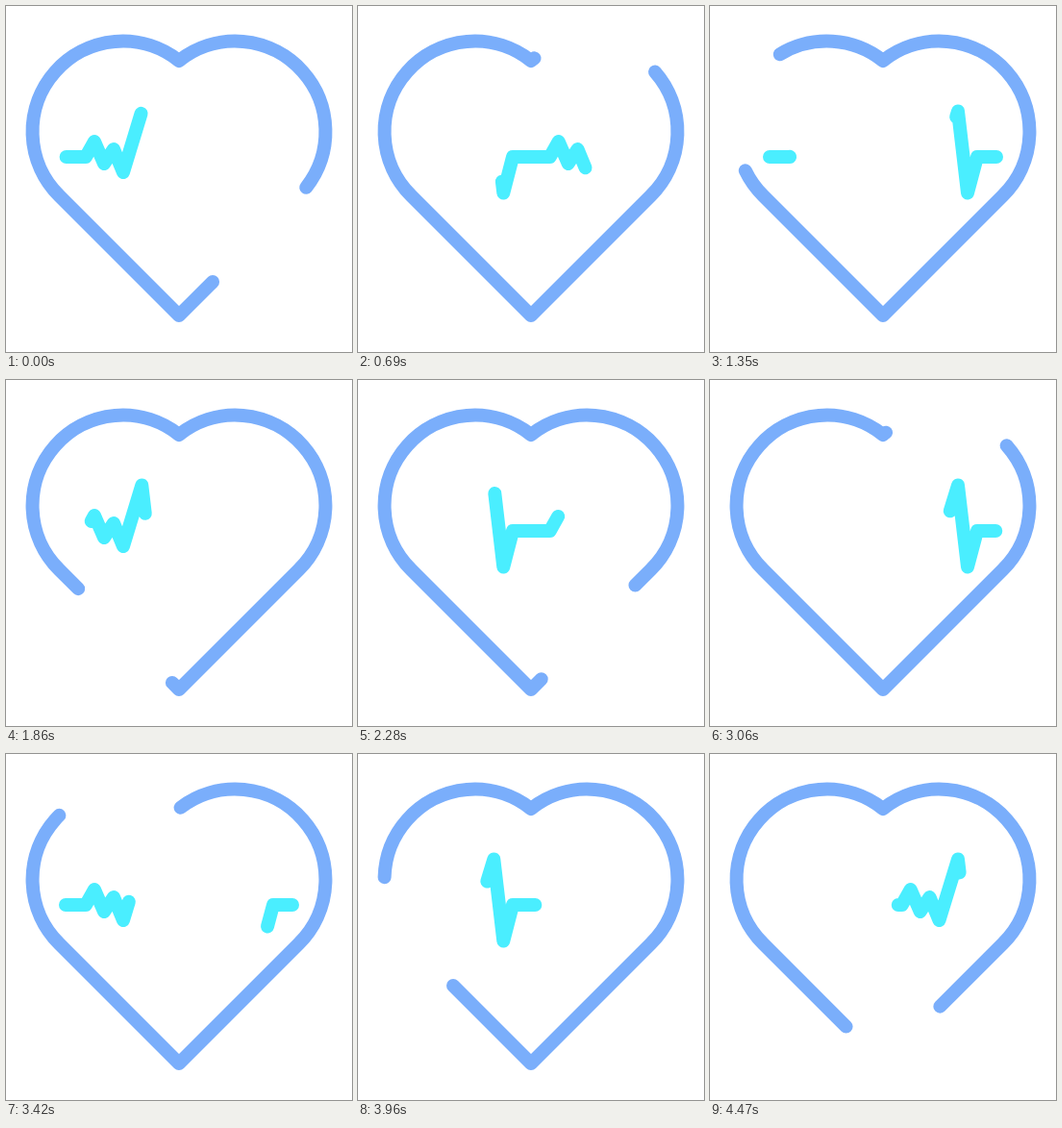
Recreate the animation shown at these times as an HTML page. Size 360 by 360 pixels, loop 4500 ms.

```html
<!DOCTYPE html>
<html lang="en">
<head>
<meta charset="utf-8">
<title>Heartbeat loader</title>
<style>
  html, body { margin: 0; width: 100%; height: 100%; overflow: hidden; background: #fff; }
  svg { display: block; width: 100%; height: 100%; }
  path { fill: none; stroke-width: 14; stroke-linecap: round; stroke-linejoin: round; }
</style>
</head>
<body>
<svg viewBox="0 0 360 360">
  <path id="heart" pathLength="100" stroke="#7aaefb" stroke-dasharray="85 15"
    d="M180 57A94 94 0 0 1 304.5 197.5L180 322L55.5 197.5A94 94 0 0 1 180 57Z"/>
  <path id="pulse" pathLength="100" stroke="#4aeeff" stroke-dasharray="27 73"
    d="M62 157H83L92 141L102 164L112 149L122 173L141.3 109.5L151.3 194.5L161 157
       H199.7L208.7 141L218.7 164L228.5 149L238.5 173L258 109.5L268 194.5L278 157H298"/>
</svg>
<script>
  const LOOP = 4500, STEP = 30;
  const HEART_TURN = 2368.5, PULSE_TURN = 1771;
  const heart = document.getElementById('heart');
  const pulse = document.getElementById('pulse');

  // Place the start of the visible dash, in percent of the path.
  function setStart(path, percent) {
    const start = ((percent % 100) + 100) % 100;
    path.setAttribute('stroke-dashoffset', (-start).toFixed(3));
  }

  function draw(ms) {
    const t = Math.floor((ms % LOOP) / STEP) * STEP;
    setStart(heart, 44.62 - 100 * t / HEART_TURN);
    setStart(pulse, 0.1 + 100 * t / PULSE_TURN);
  }

  let begin = null;
  function tick(now) {
    if (begin === null) begin = now;
    draw(Math.max(0, now - begin));
    requestAnimationFrame(tick);
  }

  draw(0);
  requestAnimationFrame(tick);
</script>
</body>
</html>
```
